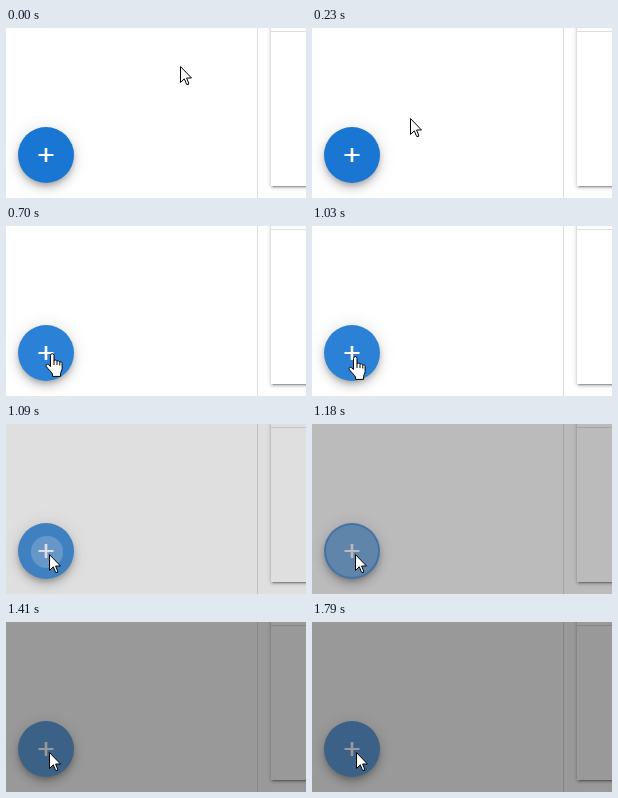
An HTML page for the animation above (1870 ms loop, 300x170 px).

```html
<!DOCTYPE html>
<html lang="en">
<head>
<meta charset="utf-8">
<title>Floating button</title>
<style>
  html, body { margin: 0; width: 100%; height: 100%; overflow: hidden; background: #fff; }
  #stage { position: relative; width: 300px; height: 170px; overflow: hidden; background: #fff; }
  #stage div, #stage svg { position: absolute; }
  .rule { left: 251px; top: 0; width: 1px; height: 170px; background: #dedede; }
  .card {
    left: 265px; top: -40px; width: 80px; height: 198px; background: #fff;
    box-shadow: 0 3px 1px -2px rgba(0,0,0,.2), 0 2px 2px rgba(0,0,0,.14), 0 1px 5px rgba(0,0,0,.2);
  }
  .line { left: 0; top: 43px; width: 80px; height: 1px; background: #dedede; }
  #fab {
    left: 12px; top: 99px; width: 56px; height: 56px; border-radius: 50%;
    box-shadow: 0 3px 5px -1px rgba(0,0,0,.2), 0 6px 10px rgba(0,0,0,.14), 0 1px 18px rgba(0,0,0,.12);
  }
  .clip { inset: 0; border-radius: 50%; overflow: hidden; }
  #ripple { border-radius: 50%; background: rgba(255,255,255,.24); }
  .plus { left: 16px; top: 16px; width: 24px; height: 24px; fill: #fff; }
  #shade { inset: 0; background: #000; }
  #cursor { left: 0; top: 0; width: 300px; height: 170px; }
  #cursor path { fill: #fff; stroke: #000; stroke-linejoin: round; }
</style>
</head>
<body>
<div id="stage">
  <div class="rule"></div>
  <div class="card"><div class="line"></div></div>
  <div id="fab">
    <div class="clip"><div id="ripple"></div></div>
    <svg class="plus" viewBox="0 0 24 24"><path d="M19.5 13H13.3V19H10.7V13H4.5V11H10.7V5H13.3V11H19.5Z"/></svg>
  </div>
  <div id="shade"></div>
  <svg id="cursor" viewBox="0 0 300 170">
    <g id="arrow"><path d="M.5 .6V16.5L4.3 12.8 6.6 18.4H8.6V17L6.6 12H11.5Z"/></g>
    <g id="hand">
      <path d="M5.5 2.4a1.75 1.75 0 0 1 3.5 0V8c0-1.3 3-1.3 3 .5c.3-1 2.8-.9 2.8.8c.3-.9 2.3-.7 2.3 1V15.5c0 2-1.6 3.5-1.6 5V23.4H7.5V21C6.5 19 3.5 16.5 1.5 13.8C.2 11.8 2.2 10.4 3.6 11.8L5.5 13.5Z"/>
      <path d="M9 8V12M12 8.5V12M14.8 9.3V12.5"/>
    </g>
  </svg>
</div>
<script>
const LOOP = 1870, STEP = LOOP / 24; // the picture is refreshed 24 times per loop
const CLICK = 1050, RELEASE = 1390;
const BLUE = [25, 118, 210];

const el = id => document.getElementById(id);
const [fab, ripple, shade, arrow, hand] = ['fab', 'ripple', 'shade', 'arrow', 'hand'].map(el);

// smooth 0..1 progress between two times
function ease(t, from, to) {
  const u = Math.min(1, Math.max(0, (t - from) / (to - from)));
  return u * u * (3 - 2 * u);
}

function show(g, on, x, y) {
  g.style.display = on ? '' : 'none';
  g.setAttribute('transform', `translate(${x} ${y})`);
}

function draw(time) {
  const t = Math.floor((time + 4) / STEP) * STEP;
  const clicked = t > CLICK;

  // pointer: glide to the button, nudge onto the plus, slip by a pixel
  const glide = ease(t, 0, 5 * STEP), nudge = ease(t, 7 * STEP, 10 * STEP);
  const slip = ease(t, 22 * STEP, 23 * STEP);
  const x = Math.round(174 - 118 * glide - 13 * nudge + slip);
  const y = Math.round(38 + 81 * glide + 11 * nudge);
  const hover = Math.hypot(x - 40, y - 127) < 28;
  show(arrow, clicked || !hover, x, y);
  show(hand, hover && !clicked, x - 7, y);

  // button: hover and focus lighten it, the ripple grows until release
  const press = clicked ? ease(t, 930, 1250) : 0;
  const light = (hover ? .08 : 0) + .24 * press;
  fab.style.background = `rgb(${BLUE.map(v => Math.round(v + (255 - v) * light))})`;
  const r = t < RELEASE ? 31 * press : 0;
  const c = 28 + 2 * (1 - press);
  ripple.style.left = ripple.style.top = c - r + 'px';
  ripple.style.width = ripple.style.height = 2 * r + 'px';

  shade.style.opacity = clicked ? .4 * ease(t, 967, 1297) : 0;
}

const start = performance.now();
function tick() {
  draw((performance.now() - start) % LOOP);
  requestAnimationFrame(tick);
}
tick();
</script>
</body>
</html>
```
